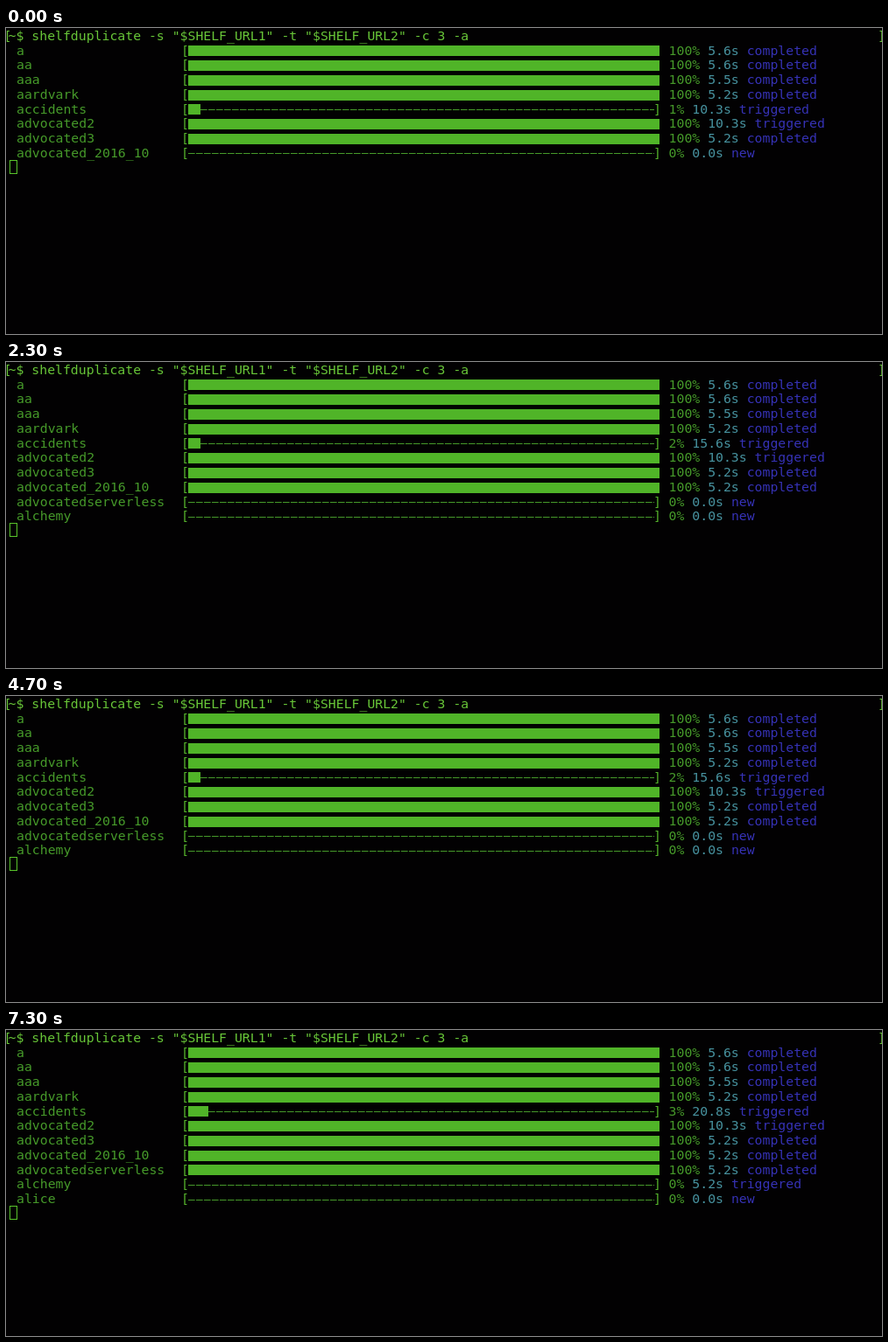
An HTML page for the animation above (7.4 s loop, 1000 px wide and 350 px high).

```html
<!DOCTYPE html>
<html lang="en">
<head>
<meta charset="utf-8">
<title>Replication progress</title>
<style>
  html, body { margin: 0; width: 100%; height: 100%; overflow: hidden; background: #020102; }
  svg { display: block; width: 1000px; height: 350px; }
  text { font: 14.8px "DejaVu Sans Mono", monospace; white-space: pre; }
  .cmd { fill: #68c638; }
  .name, .pct { fill: #469a2a; }
  .edge { fill: #55b32c; }
  .time { fill: #47929f; }
  .status { fill: #3632b6; }
  .bar { fill: #50b428; }
  .dash { stroke: #469a2a; stroke-width: 1; stroke-dasharray: 7.7 1.3; }
  .cursor { fill: none; stroke: #58c42a; }
  .screen { visibility: hidden; animation: 7400ms step-end infinite; }
  .screen:nth-of-type(1) { animation-name: first; }
  .screen:nth-of-type(2) { animation-name: second; }
  .screen:nth-of-type(3) { animation-name: third; }
  @keyframes first { 0% { visibility: visible } 18.91%, 100% { visibility: hidden } }
  @keyframes second { 0% { visibility: hidden } 18.91% { visibility: visible } 89.18%, 100% { visibility: hidden } }
  @keyframes third { 0% { visibility: hidden } 89.18%, 100% { visibility: visible } }
</style>
</head>
<body>
<svg id="term" viewBox="0 0 1000 350"></svg>
<script>
const CELL = 8.91, LINE = 16.73, BASE = 14;
const LEFT = 2.6, NAME_X = 12, BAR_X = 208, BAR_END = 746, TAIL_X = 756.6;
const BLOCK = 9, BLOCK_INK = 14;
const term = document.getElementById('term');

const rowY = row => BASE + row * LINE;

function add(parent, tag, attrs, content = '') {
  const el = document.createElementNS(term.namespaceURI, tag);
  for (const key in attrs) el.setAttribute(key, attrs[key]);
  el.textContent = content;
  return parent.appendChild(el);
}

function print(parent, row, x, cls, content) {
  add(parent, 'text', { x, y: rowY(row), class: cls }, content);
}

function drawJob(parent, row, [name, pct, blocks, time, status]) {
  const y = rowY(row), full = pct === 100;
  print(parent, row, NAME_X, 'name', name);
  print(parent, row, BAR_X - 8, 'edge', '[');

  // A block glyph is wider than its cell
  const width = full ? BAR_END - BAR_X : blocks && BLOCK_INK + (blocks - 1) * BLOCK;
  if (width) add(parent, 'rect', { x: BAR_X, y: Math.round(y - 10.25), width, height: 12, class: 'bar' });
  if (!full) {
    const lineY = Math.floor(y - 4) + 0.5;
    add(parent, 'line', { x1: BAR_X + width, x2: 740, y1: lineY, y2: lineY, class: 'dash' });
    print(parent, row, BAR_END - 7, 'edge', ']');
  }

  let x = TAIL_X;
  for (const [cls, word] of [['pct', pct + '%'], ['time', time], ['status', status]]) {
    print(parent, row, x, cls, word);
    x += (word.length + 1) * CELL;
  }
}

function drawScreen(jobs) {
  const screen = add(term, 'g', { class: 'screen' });
  jobs.forEach((job, i) => drawJob(screen, i + 1, job));
  add(screen, 'rect', {
    x: 4.5, y: Math.round(rowY(jobs.length + 1) - 13.6) + 0.5,
    width: 8, height: 15, class: 'cursor'
  });
}

const done = (name, time = '5.2s', status = 'completed') => [name, 100, 59, time, status];
const fresh = name => [name, 0, 0, '0.0s', 'new'];
const slow = (pct, blocks, time) => ['accidents', pct, blocks, time, 'triggered'];
const start = [done('a', '5.6s'), done('aa', '5.6s'), done('aaa', '5.5s'), done('aardvark')];
const middle = [done('advocated2', '10.3s', 'triggered'), done('advocated3')];

drawScreen([...start, slow(1, 1, '10.3s'), ...middle, fresh('advocated_2016_10')]);
drawScreen([...start, slow(2, 1, '15.6s'), ...middle, done('advocated_2016_10'),
  fresh('advocatedserverless'), fresh('alchemy')]);
drawScreen([...start, slow(3, 2, '20.8s'), ...middle, done('advocated_2016_10'),
  done('advocatedserverless'), ['alchemy', 0, 0, '5.2s', 'triggered'], fresh('alice')]);

// Prompt line with the margin marks at both edges
print(term, 0, -2.6, 'cmd', '[');
print(term, 0, LEFT, 'cmd', '~$ shelfduplicate -s "$SHELF_URL1" -t "$SHELF_URL2" -c 3 -a');
print(term, 0, 995, 'cmd', ']');
</script>
</body>
</html>
```
